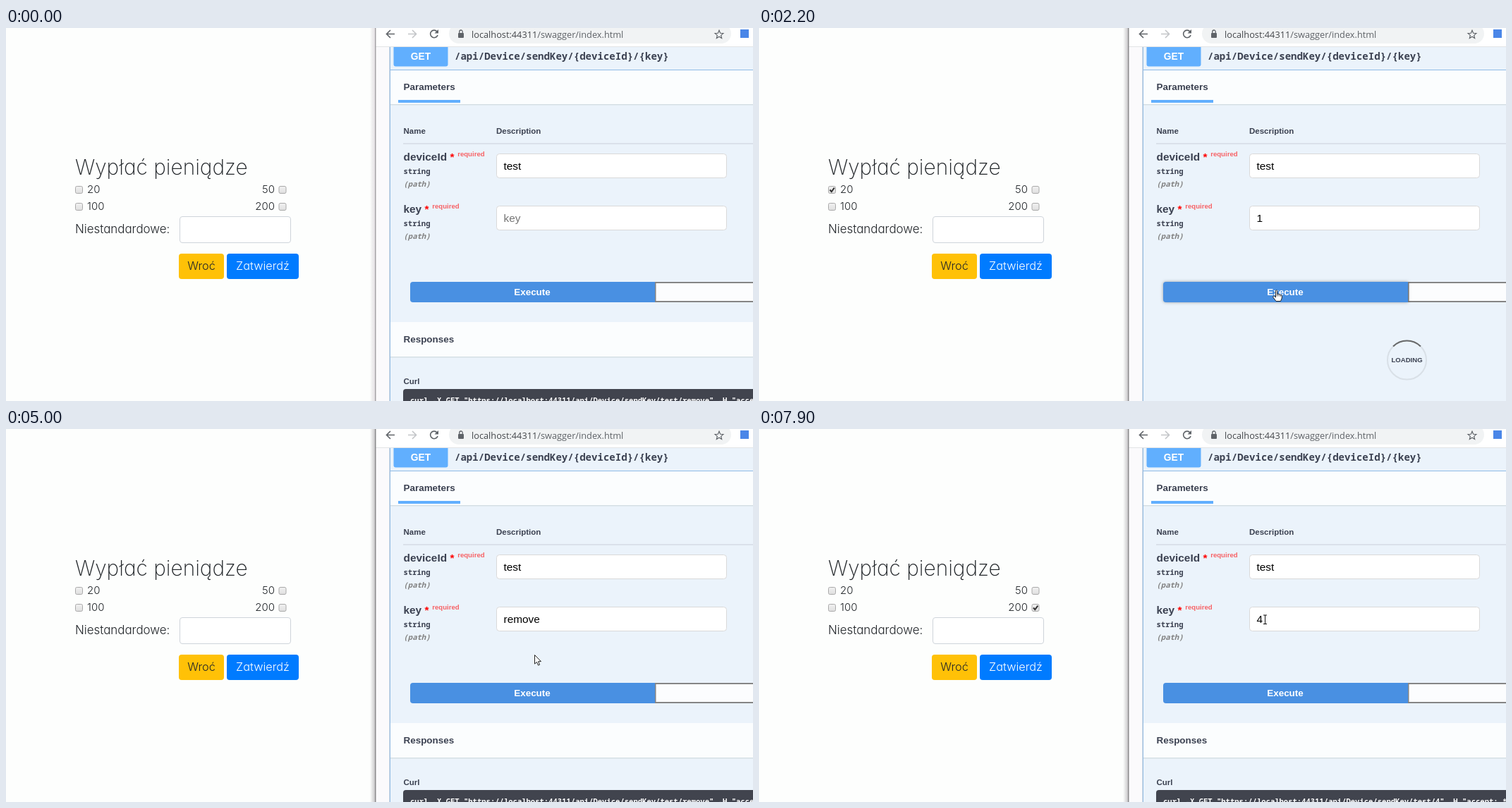
An HTML page with a canvas that plays this animation: 1059 by 529 pixels, repeating every 8000 ms.

```html
<!DOCTYPE html>
<html lang="pl">
<head>
<meta charset="utf-8">
<title>Wypłać pieniądze</title>
<style>
  html, body { margin: 0; width: 100%; height: 100%; overflow: hidden; background: #fdfefd; }
  #stage { position: relative; width: 1059px; height: 529px; overflow: hidden;
    font: 300 16.9px Inter, sans-serif; font-feature-settings: "cv11"; color: #212529; }
  #stage > * { position: absolute; box-sizing: border-box; }
  span { line-height: 0; white-space: nowrap; }
  .title { font-size: 29.8px; font-weight: 200; }
  .num { font-size: 15px; }
  .field { left: 246px; top: 267px; width: 158px; height: 38px; border: 1px solid #ced4da; border-radius: 4px; background: #fff; }
  .btn { top: 320px; height: 36px; border-radius: 4px; line-height: 34px; text-align: center; font-size: 16.3px; }
  canvas { left: 0; top: 0; }
</style>
</head>
<body>
<div id="stage">
  <span class="title" style="left:98px;top:197px">Wypłać pieniądze</span>
  <span class="num" style="left:115px;top:229px">20</span>
  <span class="num" style="right:678px;top:229px">50</span>
  <span class="num" style="left:115px;top:253px">100</span>
  <span class="num" style="right:678px;top:253px">200</span>
  <span style="left:98px;top:285px">Niestandardowe:</span>
  <div class="field"></div>
  <div class="btn" style="left:245px;width:64px;background:#ffc107">Wroć</div>
  <div class="btn" style="left:313px;width:102px;background:#007bff;color:#fff">Zatwierdź</div>
  <canvas id="view" width="1059" height="529"></canvas>
</div>
<script>
const LOOP = 8000, STEP = 100;
const ctx = document.getElementById('view').getContext('2d');
const INK = '#3b4151', BLUE = '#61affe', PANEL = '#ebf3fb', HEAD = '#fbfdfe';
const sans = (size, bold) => `${bold ? 'bold ' : ''}${size}px "Liberation Sans", Arial, sans-serif`;
const mono = (size, style = '') => `${style} 600 ${size}px "Noto Sans Mono", "DejaVu Sans Mono", monospace`;

// Requests: start time and the key that was sent
const calls = [{ at: 2200, key: '1' }, { at: 4800, key: 'remove' }, { at: 6800, key: '4' }];

// Key field: time, value, focused, selected
const fieldStates = [
  [0, '', false, false], [1200, '', true, false], [1700, '1', true, false],
  [2200, '1', false, false], [3200, '1', true, false], [3300, '1', true, true],
  [3600, 'remove', true, false], [4800, 'remove', false, false],
  [5100, 'remove', true, false], [5200, 'remove', true, true],
  [6000, '4', true, false], [6800, '4', false, false]
];

// Pointer path: time, x, y
const path = [
  [300, 1031, 34], [400, 976, 56], [500, 858, 86], [700, 778, 205], [900, 750, 262],
  [1000, 749, 265], [1700, 749, 265], [2100, 733, 371], [2300, 733, 371], [2500, 430, 344],
  [2600, 228, 247], [2700, 207, 245], [2800, 240, 249], [3100, 716, 266], [3300, 642, 265],
  [4400, 642, 265], [4700, 733, 371], [4900, 733, 371], [5100, 765, 268], [5300, 584, 265],
  [5400, 565, 265], [6400, 565, 265], [6700, 733, 371], [6900, 733, 371], [7300, 432, 277],
  [7400, 377, 276], [7500, 430, 300], [7800, 690, 272], [7900, 717, 270]
];

const lastBefore = (list, t) => list.filter(s => s[0] <= t).pop();

function pointerAt(t) {
  if (t < path[0][0]) return null;
  const i = path.findIndex(p => p[0] > t);
  if (i < 0) return path[path.length - 1].slice(1);
  const [a, b] = [path[i - 1], path[i]], k = (t - a[0]) / (b[0] - a[0]);
  return [1, 2].map(n => Math.round(a[n] + (b[n] - a[n]) * k));
}

const inside = ([x, y], l, t, r, b) => x >= l && x <= r && y >= t && y <= b;

function rect(x, y, w, h, color) {
  ctx.fillStyle = color;
  ctx.fillRect(x, y, w, h);
}

function box(x, y, w, h, r, fill, stroke, line = 1) {
  ctx.beginPath();
  ctx.roundRect(x, y, w, h, r);
  if (fill) { ctx.fillStyle = fill; ctx.fill(); }
  if (stroke) { ctx.strokeStyle = stroke; ctx.lineWidth = line; ctx.stroke(); }
}

function text(s, x, y, font, color = INK, align = 'left') {
  ctx.font = font;
  ctx.fillStyle = color;
  ctx.textAlign = align;
  ctx.fillText(s, x, y);
  return ctx.measureText(s).width;
}

function stroke(d, color, width) {
  ctx.strokeStyle = color;
  ctx.lineWidth = width;
  ctx.stroke(new Path2D(d));
}

function checkbox(x, y, on) {
  const g = ctx.createLinearGradient(0, y, 0, y + 11);
  g.addColorStop(0, '#f2f2f2');
  g.addColorStop(1, '#dedede');
  box(x + .5, y + .5, 10, 10, 2, g, '#a9a9a9');
  if (on) stroke(`M${x + 2.5} ${y + 5.5}l2.3 2.6 4-5.4`, '#333', 2);
}

function browserBar() {
  rect(524, 0, 535, 26, '#fff');
  rect(524, 26, 535, 1, '#e3e4e6');
  stroke('M551 8.5H539.5M545 3l-5.5 5.5 5.5 5.5', '#5f6368', 1.6);
  stroke('M570 8.5H581.5M576 3l5.5 5.5-5.5 5.5', '#c3c5c8', 1.6);
  stroke('M611 5A5.3 5.3 0 1 0 612 10', '#5f6368', 1.6);
  ctx.fillStyle = '#5f6368';
  ctx.fill(new Path2D('M613 2v5.5h-5.5z'));
  box(628, -6, 400, 28, 14, '#f1f3f4');
  box(641, 7, 8, 7, 1, '#5f6368');
  stroke('M642.8 7V5.2a2.2 2.2 0 0 1 4.4 0V7', '#5f6368', 1.3);
  const font = '12.75px "Open Sans", "Noto Sans", sans-serif';
  const w = text('localhost:44311', 660, 14, font, '#45484c');
  text('/swagger/index.html', 660 + w, 14, font, '#5f6368');
  ctx.beginPath();
  for (let i = 0; i < 10; i++) {
    const a = i * Math.PI / 5 - Math.PI / 2, r = i % 2 ? 2.8 : 6.2;
    ctx.lineTo(1011 + r * Math.cos(a), 9.5 + r * Math.sin(a));
  }
  ctx.closePath();
  ctx.strokeStyle = '#5f6368';
  ctx.lineWidth = 1.2;
  ctx.stroke();
  rect(1041, 2, 12, 12, '#4a86e8');
}

function windowEdge(active) {
  const g = ctx.createLinearGradient(516, 0, 523, 0);
  g.addColorStop(0, 'rgba(150,145,152,0)');
  g.addColorStop(1, active ? 'rgba(135,132,137,.45)' : 'rgba(190,175,190,.35)');
  rect(516, 0, 7, 529, g);
  rect(523, 0, 1.5, 529, active ? '#8b8b8d' : '#a5a3a6');
}

function sectionHead(label, y, h) {
  rect(545, y, 514, h, HEAD);
  rect(545, y + h, 514, 1, '#d3dde3');
  rect(545, y + h + 1, 514, 1, '#e2ebf1');
  text(label, 563.5, y + (h > 48 ? 29 : 28), sans(13.45, true));
}

function parameter(name, y) {
  const w = text(name, 563.5, y, sans(15.4, true));
  text('*', 567.8 + w, y, sans(15.4, true), '#f00');
  text('required', 578.6 + w, y - 6.5, sans(9.6, true), 'rgba(255,0,0,.6)');
  text('string', 563.5, y + 19, mono(10.56));
  text('(path)', 563.5, y + 37, mono(10.56, 'italic'), '#808080');
}

function keyField(t) {
  const [start, full, focus, selected] = lastBefore(fieldStates, t);
  const value = focus && start === 3600 ? full.slice(0, (t - start) / STEP + 1) : full;
  box(695.5, 252.5, 326, 34, 4, '#fff', '#d9d9d9');
  if (focus) box(694.75, 251.75, 326.5, 35, 2, null, '#6b9fe6', 1.5);
  ctx.font = sans(15.4);
  const w = ctx.measureText(value).width;
  if (selected) rect(705, 261, w, 17, '#3390ff');
  text(value || 'key', 705.5, 274.5, sans(15.4), selected ? '#fff' : value ? '#000' : '#757575');
  if (focus && !selected) rect(Math.round(705 + w), 261, 1, 17, '#000');
}

function spinner(age) {
  const a = age / 1000 * 2 * Math.PI;
  const arc = (from, to, color) => {
    ctx.beginPath();
    ctx.arc(918.5, 471, 27.5, from, to);
    ctx.strokeStyle = color;
    ctx.lineWidth = 2;
    ctx.stroke();
  };
  arc(0, 2 * Math.PI, 'rgba(85,85,85,.12)');
  arc(a - Math.PI * .75, a - Math.PI * .25, 'rgba(85,85,85,.85)');
  text('LOADING', 918.5, 474, sans(9.6, true), INK, 'center');
}

function responses(key) {
  sectionHead('Responses', 417, 49);
  text('Curl', 563.5, 505, sans(11.5, true));
  box(563, 512, 520, 40, 4, '#41444e');
  text(`curl -X GET "https://localhost:44311/api/Device/sendKey/test/${key}" -H "accept: */*"`,
    573, 532, mono(10.56), '#fff');
}

function apiPage(t, hover) {
  rect(524.5, 26, 535, 503, '#fbfafc');
  rect(543, 27, 1, 502, '#d3dce6');
  rect(544, 27, 1, 502, '#94bce2');
  rect(545, 27, 514, 502, PANEL);
  box(549.5, 20, 77, 34.5, 3, BLUE);
  text('GET', 588, 45, sans(13.8, true), '#fff', 'center');
  text('/api/Device/sendKey/{deviceId}/{key}', 636, 45, mono(14.07));
  rect(545, 59, 514, 1, '#8fbbe6');
  sectionHead('Parameters', 60, 48);
  rect(556, 102, 88, 4, BLUE);

  text('Name', 563.5, 150, sans(11.5, true));
  text('Description', 695, 150, sans(11.5, true));
  rect(563, 163.5, 496, 1, '#c9d0da');
  parameter('deviceId', 188);
  parameter('key', 262);
  box(695.5, 178.5, 326, 34, 4, '#fff', '#d9d9d9');
  text('test', 705.5, 200.5, sans(15.4), '#000');
  keyField(t);

  box(920.5, 361, 200, 27, 0, '#fcfdfe', '#858585', 2);
  if (hover) {
    ctx.shadowColor = 'rgba(0,0,0,.35)';
    ctx.shadowBlur = 4;
  }
  box(573, 360, 347, 29, [4, 0, 0, 4], '#4990e2');
  ctx.shadowColor = 'transparent';
  text('Execute', 746, 379, sans(13.45, true), '#fff', 'center');

  const busy = calls.find(c => t >= c.at && t < c.at + STEP);
  const done = calls.filter(c => t >= c.at + STEP).pop();
  if (busy) spinner(t - busy.at);
  else responses(done ? done.key : 'remove');
}

const shapes = {
  arrow: 'M0 0V12.6L3 10 5 14.6 7 13.8 5.1 9.2H9z',
  hand: 'M-1 1.2Q0-.8 1.2 1V6Q3 4.8 3.6 6.4 5.2 5.4 5.8 7 7.6 6.4 7.8 8.6V11.5L6 16H-.5L-4.8 10.2Q-5 8-2.8 8.8L-1 10.5z'
};

function pointer([x, y], kind) {
  ctx.save();
  ctx.translate(x + .5, y + .5);
  if (kind === 'beam') {
    stroke('M-2.5-6.5H2.5M-2.5 6H2.5M0-6.5V6', '#111', 1);
  } else {
    ctx.fillStyle = '#fff';
    ctx.fill(new Path2D(shapes[kind]));
    stroke(shapes[kind], '#222', 1);
    if (kind === 'hand') stroke('M1.2 6V9M3.6 6.5V9M5.8 7V9.3', '#222', .8);
  }
  ctx.restore();
}

function draw(now) {
  const t = Math.floor(now % LOOP / STEP) * STEP;
  const pos = pointerAt(t);
  const hover = pos && inside(pos, 573, 360, 920, 389);
  const beam = pos && (inside(pos, 695, 252, 1021, 287) || inside(pos, 560, 248, 590, 270));

  ctx.clearRect(0, 0, 1059, 529);
  checkbox(98, 224, t >= 2200 && t < 4800);
  checkbox(386.5, 224, false);
  checkbox(98, 248, false);
  checkbox(386.5, 248, t >= 6800);
  apiPage(t, hover);
  browserBar();
  windowEdge(t >= 1200);
  if (pos) pointer(pos, hover ? 'hand' : beam ? 'beam' : 'arrow');
}

const begin = performance.now();
function tick() {
  draw(performance.now() - begin);
  requestAnimationFrame(tick);
}
tick();
</script>
</body>
</html>
```
